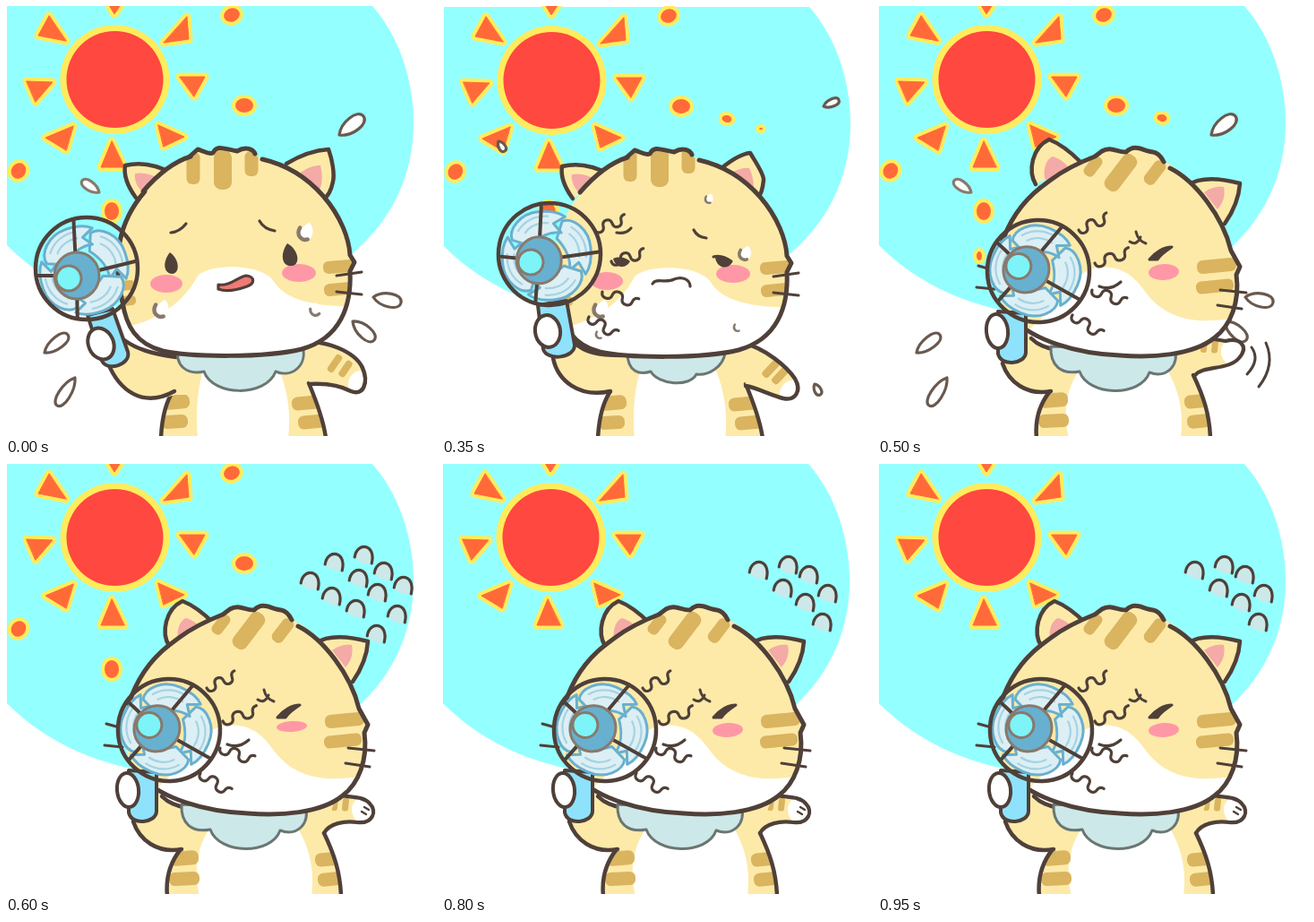
An HTML page with a canvas that plays this animation: 480x480 px, repeating every 1 s.

```html
<!DOCTYPE html>
<html lang="en">
<head>
<meta charset="utf-8">
<title>Hot cat with a fan</title>
<style>
html, body { margin: 0; width: 100%; height: 100%; overflow: hidden; background: #fff; }
canvas { display: block; width: 480px; height: 480px; }
</style>
</head>
<body>
<canvas id="stage" width="480" height="480"></canvas>
<script>
const ctx = document.getElementById('stage').getContext('2d');
const INK = '#4f4039', FUR = '#fdeaa9', STRIPE = '#dab45f', PINK = '#ff98a6', EAR = '#f4aaa6';
const SKY = '#94ffff', SUN = '#ff4840', RAY = '#ff6a38', GLOW = '#ffec5c';
const BIB = '#cde8e8', BLUE = '#68b0cf', HANDLE = '#8ee2fc', PALE = '#dceff4';
const GREY = '#877a6d', WET = '#69594f';

ctx.lineCap = ctx.lineJoin = 'round';

function shape(d, fill, stroke, width = 4) {
  const path = typeof d === 'string' ? new Path2D(d) : d;
  if (fill) { ctx.fillStyle = fill; ctx.fill(path); }
  if (stroke) { ctx.strokeStyle = stroke; ctx.lineWidth = width; ctx.stroke(path); }
}
const line = (d, width = 4, color = INK) => shape(d, null, color, width);

function oval(x, y, rx, ry, fill, stroke, width, turn = 0) {
  const path = new Path2D();
  path.ellipse(x, y, rx, ry, turn, 0, Math.PI * 2);
  shape(path, fill, stroke, width);
}

function group(x, y, turn, draw) {
  ctx.save();
  ctx.translate(x, y);
  ctx.rotate(turn);
  draw();
  ctx.restore();
}

function inside(d, draw) {
  ctx.save();
  ctx.clip(new Path2D(d));
  draw();
  ctx.restore();
}

// Rounded fur mark centred on x, y
function mark(x, y, w, h, turn = 0) {
  group(x, y, turn, () => {
    const path = new Path2D();
    path.roundRect(-w / 2, -h / 2, w, h, Math.min(w, h) / 2.4);
    shape(path, STRIPE);
  });
}

// Teardrop from its tail to its round end
function drop(x1, y1, x2, y2, w, color = WET) {
  const len = Math.hypot(x2 - x1, y2 - y1), k = w * 0.62;
  group(x1, y1, Math.atan2(y2 - y1, x2 - x1), () =>
    shape(`M0 0C${len * .3} ${-k} ${len} ${-k} ${len} 0C${len} ${k} ${len * .3} ${k} 0 0Z`, '#fff', color, 3.2));
}

function sweat(x, y, s, turn = 0.2) {
  group(x, y, turn, () => {
    ctx.scale(s, s);
    shape('M2 -10C10 -5 10 9 0 9C-10 9 -7 -2 2 -10Z', '#fff');
    line('M-6 -3C-9 6 -1 10 4 7', 4, GREY);
  });
}

// Meandering stroke between two points
function wave(x1, y1, x2, y2, amp = 5.5, turns = 1.75) {
  const dx = x2 - x1, dy = y2 - y1, len = Math.hypot(dx, dy), path = new Path2D();
  for (let i = 0; i <= 60; i++) {
    const t = i / 60, a = t * turns * Math.PI * 2;
    const n = amp * Math.sin(a), u = t - 0.035 * Math.sin(a * 2);
    path.lineTo(x1 + dx * u - dy / len * n, y1 + dy * u + dx / len * n);
  }
  line(path, 3.2);
}

// ---- sky ----
const RAYS = ['M112 -6L121 9L131 -6Z', 'M48 11L36 33L67 39Z', 'M23 84L52 85L33 107Z', 'M75 134L44 147L67 161Z',
  'M118 151L106 180L132 180Z', 'M170 133L199 146L176 157Z', 'M194 79L222 79L210 101Z', 'M202 12L204 37L176 41Z'];
const SPARKS = {
  top: [252, 10, 11, 9.5, -.4], right: [266, 111, 12, 10, 0], left: [14, 184, 10, 11, .6],
  low: [118, 229, 10, 12, 0], mid: [317, 125, 7.5, 6, .2], tiny: [355, 136, 4, 3, 0], last: [113, 279, 5, 7, 0]
};

function sky(size, sparks) {
  shape('M1 0H409C440 35 455 85 455 130C455 190 430 240 385 278C330 325 240 347 180 346C110 340 45 312 1 267Z', SKY);
  ctx.save();
  ctx.translate(122, 82);
  ctx.scale(size, size);
  ctx.translate(-122, -82);
  for (const ray of RAYS) {
    line(ray, 9, GLOW);
    shape(ray, RAY, RAY, 1);
  }
  oval(121.5, 82, 61, 61, GLOW);
  oval(121.5, 82, 54, 54, SUN);
  ctx.restore();
  for (const key of sparks.split(' ').filter(Boolean)) {
    const [x, y, rx, ry, turn] = SPARKS[key];
    oval(x, y, rx, ry, RAY, GLOW, 4, turn);
  }
}

// ---- fan ----
function blade() {
  shape('M3 -22L1 -42C10 -51 32 -46 42 -27C49 -14 50 -6 48 2L36 -7L30 5C27 -6 17 -16 3 -22Z', PALE, BLUE, 3);
  line('M13 -40C27 -38 37 -28 41 -16M14 -32C24 -30 31 -22 34 -13', 2.2, '#a5d3e4');
}

// The hub sits off centre, so the whole fan turns with the wrist
function fan(x, y, turn, spin) {
  group(x, y, turn, () => {
    for (let i = 0; i < 4; i++) group(-3, 2, spin + i * Math.PI / 2, blade);
    for (const a of [-1.83, -0.15, 1.75, 3.0]) {
      const c = Math.cos(a), s = Math.sin(a);
      line(`M${c * 22 - 7} ${s * 22 + 5}L${c * 57} ${s * 57}`, 4);
    }
    oval(-11, 8, 25, 26, BLUE, GREY, 3);
    oval(-20, 11, 14, 14, '#7df4f8', GREY, 3);
    oval(0, 0, 57, 57, null, INK, 4.5);
  });
}

// ---- front-facing cat ----
const HEAD = 'M130 330C120 290 122 245 155 207C172 185 190 173 207 167L214 160C221 162 226 166 231 164C236 154 244 160 258 162C268 156 278 161 280 168C310 176 333 188 354 212C374 235 383 260 384 278L389 286L384 296C386 335 373 371 330 383C290 393 205 392 175 385C145 377 134 357 130 330Z';

function frontHead(open) {
  const leftEar = 'M145 214C137 203 131 190 133 178C149 174 168 177 186 187';
  const rightEar = open ? 'M313 176C328 167 344 161 360 160C364 171 367 187 365 196C363 206 359 213 354 216'
    : 'M311 180C322 171 334 164 343 163C350 175 358 186 358 193C357 204 354 211 351 214';
  shape(leftEar, FUR, INK, 4.5);
  shape(rightEar, FUR, INK, 4.5);
  shape('M144 187C153 185 166 189 170 193C160 199 154 204 151 206C146 201 143 194 144 187Z', EAR);
  shape(open ? 'M328 187C336 180 344 178 351 178C354 190 353 200 349 207Z'
    : 'M322 185C330 181 337 179 342 180C346 188 348 199 346 207Z', EAR);
  shape(HEAD, FUR);
  inside(HEAD, () => {
    shape('M120 360C168 356 200 328 213 303C222 287 288 286 300 309C313 328 345 336 388 335V395H120Z', '#fff');
    const lift = open ? 0 : -4;
    mark(209, 181 + lift, 15, 36);
    mark(242, 183 + lift, 20, 44);
    mark(274, 176 + lift, 15, 28);
    mark(372, 291, 36, 14, -.08);
    mark(372, 316, 34, 14, -.1);
    mark(134, 312, 20, 11, -.1);
    mark(135, 329, 20, 11, -.1);
  });
  line('M153 207C172 185 190 173 206 168', 5);
  line('M205 168L214 160C221 162 226 166 231 164C236 154 244 160 258 162C268 156 276 160 278 165', 5);
  line('M286 171C308 176 333 188 354 212C374 235 383 260 384 278L389 286L384 296C386 335 373 371 330 383C290 393 205 392 175 385C145 377 134 357 130 330', 5);
  if (open) line('M130 330C120 290 122 245 155 207', 5);
  line('M369 301L397 297M369 319L397 322', 3);
  if (open) {
    oval(179, 310, 18, 10, PINK);
    oval(327, 298, 19, 10, PINK);
    line('M184 253Q194 252 201 243M283 240Q288 249 300 251', 3.2);
    shape('M183 275C193 282 195 297 186 299C176 299 174 286 183 275Z', INK);
    shape('M314 265C327 272 329 289 319 290C307 291 306 276 314 265Z', INK);
    shape('M237 311C250 313 258 303 268 301C278 302 278 310 269 313C258 317 245 319 237 316Z', '#f07a75', INK, 3.2);
    sweat(334, 252, 1.1);
    sweat(173, 338, 1.1);
    sweat(345, 339, .8, -.3);
  } else {
    oval(183, 306, 18, 10, PINK);
    oval(324, 298, 19, 10, PINK);
    line('M194 252Q204 254 210 247M280 249Q284 257 294 258', 3.2);
    shape('M190 281C197 278 205 280 209 284C204 293 193 292 190 281Z', INK);
    shape('M304 280C310 277 320 279 323 285C318 294 306 292 304 280Z', INK);
    line('M302 279Q311 276 322 284', 3);
    line('M234 309C238 302 249 309 258 304C268 300 276 305 276 312', 3.2);
    sweat(297, 214, .6);
    sweat(337, 275, .9);
    sweat(176, 337, 1.1);
    sweat(175, 365, .6);
    sweat(329, 357, .6);
  }
}

function frontBody(open) {
  shape('M188 385C189 432 174 440 174 490H357C355 450 345 435 338 420V380Z', FUR);
  shape('M222 400C212 430 212 460 214 482H315C319 450 312 420 302 400Z', '#fff');
  inside('M189 425C178 440 174 460 173 482H357C353 455 345 437 338 421Z', () => {
    mark(190, 442, 30, 16, -.08);
    mark(188, 464, 30, 15, -.05);
    mark(336, 443, 34, 15, -.1);
    mark(343, 464, 34, 15, -.1);
  });
  line('M187 429C179 441 174 460 173 482M338 421C346 440 354 460 357 482', 4.5);

  const arm = open ? 'M330 377C355 371 390 386 398 404C405 420 399 436 385 430C372 423 356 421 339 422'
    : 'M333 375C360 380 385 403 393 415C401 429 393 440 380 437C365 433 350 425 338 423';
  shape(arm, FUR);
  inside(arm + 'Z', () => {
    if (open) {
      oval(396, 423, 14, 16, '#fff');
      mark(367, 399, 8, 22, .6);
      mark(379, 405, 8, 20, .6);
    } else {
      oval(390, 432, 14, 15, '#fff');
      mark(367, 403, 9, 26, .75);
      mark(377, 411, 9, 24, .75);
    }
  });
  line(arm, 4.5);

  const left = open ? 'M112 394C122 425 150 448 189 434H202V390C160 388 143 380 128 372Z'
    : 'M122 388C126 416 152 437 187 430H202V388C166 390 153 382 144 372Z';
  shape(left, FUR);
  line(open ? 'M114 399C126 428 152 450 188 430M132 373C146 383 162 388 190 392'
    : 'M123 392C128 417 152 437 187 429M147 375C158 385 172 389 200 389', 4.5);

  shape(open ? 'M192 380C188 402 202 412 221 408C231 436 290 437 301 408C320 416 337 400 331 380Z'
    : 'M206 386C206 408 220 411 232 407C241 422 275 425 283 410C296 412 313 402 315 386Z', BIB, '#6b7672', 3);
}

function frontCat(open, spin) {
  frontBody(open);
  frontHead(open);
  if (open) {
    shape('M91 345L107 396C113 409 140 400 136 386L119 338Z', HANDLE, INK, 4);
    fan(90, 293, 0, spin);
    oval(106, 377, 14, 18, '#fff', INK, 4, -.4);
  } else {
    shape('M106 333L112 382C116 396 148 392 147 377L138 328Z', HANDLE, INK, 4);
    fan(119, 276, .1, spin);
    wave(169, 248, 204, 237);
    wave(188, 284, 225, 275);
    wave(178, 318, 217, 331);
    wave(163, 346, 193, 366);
    oval(117, 362, 14, 18, '#fff', INK, 4, -.15);
  }
}

// ---- cat leaning into the breeze ----
const LEAN = 'M137 268C150 225 190 188 242 168L250 162C260 156 268 164 277 163C287 153 296 162 307 163C314 164 317 170 320 174C352 188 385 235 394 273L404 291L400 300C404 330 394 356 376 370C352 390 305 393 270 390C220 388 175 373 151 350C129 326 129 292 137 268Z';

function leanHead(up, squint) {
  group(up ? 0 : 6, up ? 0 : 4, 0, () => {
    shape('M176 199C167 184 172 158 191 149C204 154 216 164 226 174', FUR, INK, 4.5);
    shape('M186 192C184 180 189 170 195 168C203 170 209 176 213 180C201 185 194 190 188 195Z', EAR);
  });
  shape('M346 200C360 190 385 193 404 198C403 214 396 230 387 243', FUR, INK, 4.5);
  shape('M364 208C372 202 380 201 386 202C388 212 385 220 379 227Z', EAR);
  shape(LEAN, FUR);
  inside(LEAN, () => {
    shape('M150 375C202 342 215 297 243 292C278 288 290 308 303 325C325 350 358 356 398 348V400H150Z', '#fff');
    mark(240, 179, 13, 25, .65);
    mark(271, 186, 18, 47, .65);
    mark(309, 186, 14, 30, .65);
    const sag = up ? 4 : 0;
    mark(378, 286 + sag, 44, 15, -.1);
    mark(376, 309 + sag, 42, 14, -.1);
  });
  line('M181 203L193 194C209 182 224 175 242 168L250 162C260 156 268 164 277 163C287 153 296 162 307 163C314 164 317 170 319 174', 5);
  line('M326 181C354 195 385 235 394 273L404 291L400 300C404 330 394 356 376 370C352 390 305 393 270 390C220 388 175 373 151 350', 5);
  line('M137 268C147 237 162 218 181 203', 5);
  line('M382 317L411 320M379 334L406 338M112 290L130 295M110 314L130 316', 3);
  oval(319, squint === 6 ? 293 : 297, 17, squint, PINK, null, 0, -.06);
  shape('M303 283C309 275 319 269 328 269C322 273 315 278 312 283Z', INK, INK, 3);
  line('M281 263Q289 268 293 258M288 252Q290 262 299 265', 3);
  line('M247 313Q260 318 271 308', 3.2);
}

function leanBody(up) {
  shape('M205 385C198 432 180 440 179 490H375C374 450 361 428 355 412L374 370Z', FUR);
  shape('M229 405C211 428 210 460 216 482H341C345 450 337 425 325 405Z', '#fff');
  inside('M195 425C183 442 180 460 180 482H374C370 445 363 430 355 412Z', () => {
    mark(199, 440, 32, 16, -.08);
    mark(199, 463, 34, 15, -.05);
    mark(362, 441, 34, 15, -.1);
    mark(366, 463, 36, 15, -.1);
  });
  line('M195 430C183 445 178 462 180 482M355 412C366 435 373 455 374 482', 4.5);
  const arm = up ? 'M357 412C367 401 394 407 406 393C418 379 406 370 391 374L360 369'
    : 'M355 412C361 401 378 398 392 400C409 402 415 388 406 379C398 370 385 373 369 369';
  shape(arm, FUR);
  inside(arm + 'Z', () => {
    oval(402, 386, 16, 16, '#fff');
    mark(367, 378, 7, 18, .1);
    mark(379, 380, 7, 15, .1);
  });
  line(arm, 4.2);
  if (!up) line('M397 388L402 391M400 383L405 386', 2.4);
  shape('M142 396C149 420 169 435 196 430H212V385C190 382 180 375 169 366Z', FUR);
  line('M142 399C149 420 169 435 196 430M174 371C182 379 190 381 205 385', 4.5);
  shape('M196 380C195 401 207 412 228 408C238 436 296 437 306 409C326 417 340 399 334 383Z', BIB, '#6b7672', 3);
}

function leanCat(up, squint) {
  group(up ? -3 : 0, 0, 0, () => leanBody(up));
  leanHead(up, squint);
  group(up ? -3 : 0, up ? -1 : 0, 0, () => {
    shape('M137 342V389C140 404 167 401 168 388V344Z', HANDLE, INK, 4);
    fan(182, 297, .75, .15);
    oval(136, 364, 12, 19, '#fff', INK, 4, -.1);
  });
  wave(224, 250, 257, 236);
  wave(242, 287, 281, 275);
  wave(239, 317, 276, 331);
  wave(217, 345, 249, 367);
  if (up) line('M417 381Q427 395 412 411M433 376Q444 401 425 425', 3);
}

// ---- drops ----
function bigDrops() {
  drop(372, 144, 399, 123, 17);
  drop(104, 208, 85, 195, 11, GREY);
  drop(410, 325, 441, 331, 16);
  drop(387, 352, 411, 373, 15);
  drop(43, 387, 69, 367, 14);
  drop(77, 415, 57, 446, 14);
}

function midDrops() {
  drop(400, 124, 422, 112, 13);
  drop(72, 172, 82, 188, 10);
  drop(444, 345, 457, 361, 10);
  drop(412, 386, 421, 409, 15);
  drop(42, 393, 27, 408, 9);
  drop(70, 443, 52, 468, 12, GREY);
}

function smallDrops() {
  drop(425, 111, 442, 104, 9);
  drop(62, 150, 69, 161, 8);
  drop(415, 421, 421, 433, 8);
}

function puffs(points) {
  for (const [x, y] of points) group(x, y, .2, () => {
    shape('M-9 6C-12 -12 10 -14 10 7C6 11 -2 11 -9 6Z', BIB);
    line('M-10 5C-11 -13 11 -14 10 8', 3.2);
  });
}
const WIDE = [[340, 130], [367, 109], [400, 101], [422, 119], [444, 135], [394, 127],
  [364, 147], [415, 143], [391, 161], [437, 167], [414, 189]];
const NARROW = [[354, 118], [387, 112], [410, 123], [431, 144], [381, 138], [406, 154], [425, 176]];

// ---- scenes ----
function calm() {
  sky(1, 'top right left low');
  frontCat(true, .15);
  bigDrops();
}
function droop() {
  sky(.94, 'top right left low mid');
  frontCat(false, -.25);
  midDrops();
}
function fade() {
  ctx.translate(1, 1);
  sky(1, 'top right left low mid tiny');
  frontCat(false, .3);
  smallDrops();
}
function waveUp() {
  sky(1, 'top right left mid low last');
  bigDrops();
  leanCat(true, 9);
}
function puffWide() {
  sky(1, 'top right left low');
  leanCat(false, 6);
  puffs(WIDE);
}
function puffNarrow() {
  sky(1, '');
  leanCat(false, 8);
  puffs(NARROW);
}

const BEAT = [waveUp, puffWide, puffNarrow];
function sceneAt(ms) {
  if (ms < 200) return calm;
  if (ms < 350) return droop;
  if (ms < 500) return fade;
  if (ms < 550) return waveUp;
  return BEAT[Math.floor((ms - 550) / 50) % 3];
}

let start = null;
function frame(now) {
  start ??= now;
  ctx.setTransform(1, 0, 0, 1, 0, 0);
  ctx.fillStyle = '#fff';
  ctx.fillRect(0, 0, 480, 480);
  sceneAt((now - start) % 1000)();
  requestAnimationFrame(frame);
}
requestAnimationFrame(frame);
</script>
</body>
</html>
```
